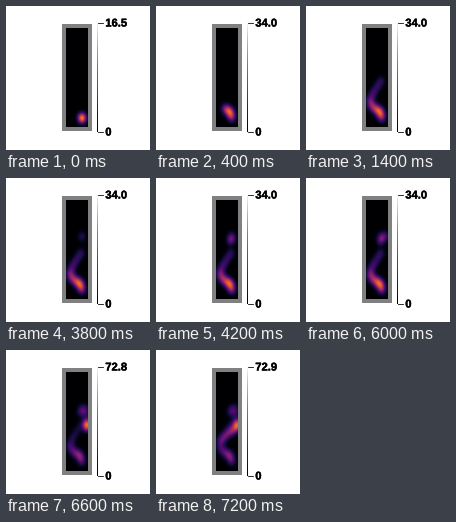
Recreate the animation shown at these times as a matplotlib script. Size 144 by 144 pixels, loop 8000 ms.

```python
import numpy as np
import matplotlib.pyplot as plt
from matplotlib.animation import FuncAnimation
from matplotlib.patches import Rectangle
from matplotlib.patheffects import withStroke

SIZE, DPI, STEP, FRAMES = 144, 100, 200, 40
PX = 72 / DPI
LEFT, RIGHT, TOP, BOTTOM = 60, 82, 22, 121
BAR_TOP, BAR_BOTTOM = 16.5, 125.5
PEAK = 0.69
SPREAD_X, SPREAD_Y = 2.9, 3.5

# Each run: first step, base rate, height of the burst, one point per step
RUNS = [
    (0, 0.7, 1.0, [(76, 112), (74, 105.5), (69, 102.5), (65, 99),
                   (64, 93.5), (68.5, 85), (75, 75)]),
    (19, 0.7, 0, [(76, 58.5), (74.5, 63)]),
    (30, 0.7, 0, [(79.5, 58), (79.5, 65)]),
    (32, 1.3, 1.9, [(81, 72), (81, 77), (73, 83), (65, 90)]),
]
LABELS = {0: "16.5", 1: "28.8", 2: "34.0", 32: "52.2", 33: "72.8", 34: "72.9"}

X, Y = np.meshgrid(np.arange(LEFT, RIGHT) + 0.5, np.arange(TOP, BOTTOM) + 0.5)


def rate_map(step):
    """Smoothed activity along the track up to this step, scaled to its peak."""
    field = np.zeros_like(X)
    for start, base, burst, points in RUNS:
        xs, ys = zip(*points)
        ks = np.arange(len(points))
        for k in np.arange(0, min(step - start, ks[-1]) + 0.1, 0.5):
            x, y = np.interp(k, ks, xs), np.interp(k, ks, ys)
            rate = base + burst * np.exp(-(k - 1) ** 2)
            field += rate * np.exp(-((X - x) / SPREAD_X) ** 2 / 2
                                   - ((Y - y) / SPREAD_Y) ** 2 / 2)
    return PEAK * field / field.max()


fig = plt.figure(figsize=(SIZE / DPI, SIZE / DPI), dpi=DPI, facecolor="white")
ax = fig.add_axes([0, 0, 1, 1])
ax.axis("off")


def show_image(data, extent):
    return ax.imshow(data, cmap="inferno", vmin=0, vmax=1, extent=extent,
                     interpolation="nearest", aspect="auto", zorder=2)


def add_label(y, text):
    ax.plot([92, 96.5], [y, y], color="black", lw=0.8 * PX)
    return ax.text(99.3, y, text, family="Liberation Sans", weight="bold",
                   size=11.2 * PX, ha="left", va="center_baseline",
                   path_effects=[withStroke(linewidth=0.4 * PX,
                                            foreground="black")])


ax.add_patch(Rectangle((56, 18), 30, 107, color="#808080", lw=0))
heat = show_image(rate_map(0), (LEFT, RIGHT, BOTTOM, TOP))
show_image(np.linspace(1, 0, 109)[:, None], (91, 92, BAR_BOTTOM + 0.5, BAR_TOP + 0.5))
top_label = add_label(BAR_TOP, "")
add_label(BAR_BOTTOM, "0")
ax.set(xlim=(0, SIZE), ylim=(SIZE, 0))


def update(step):
    heat.set_data(rate_map(step))
    top_label.set_text(LABELS[max(t for t in LABELS if t <= step)])
    return heat, top_label


anim = FuncAnimation(fig, update, frames=FRAMES, interval=STEP,
                     repeat=True, repeat_delay=0)
plt.show()
```
